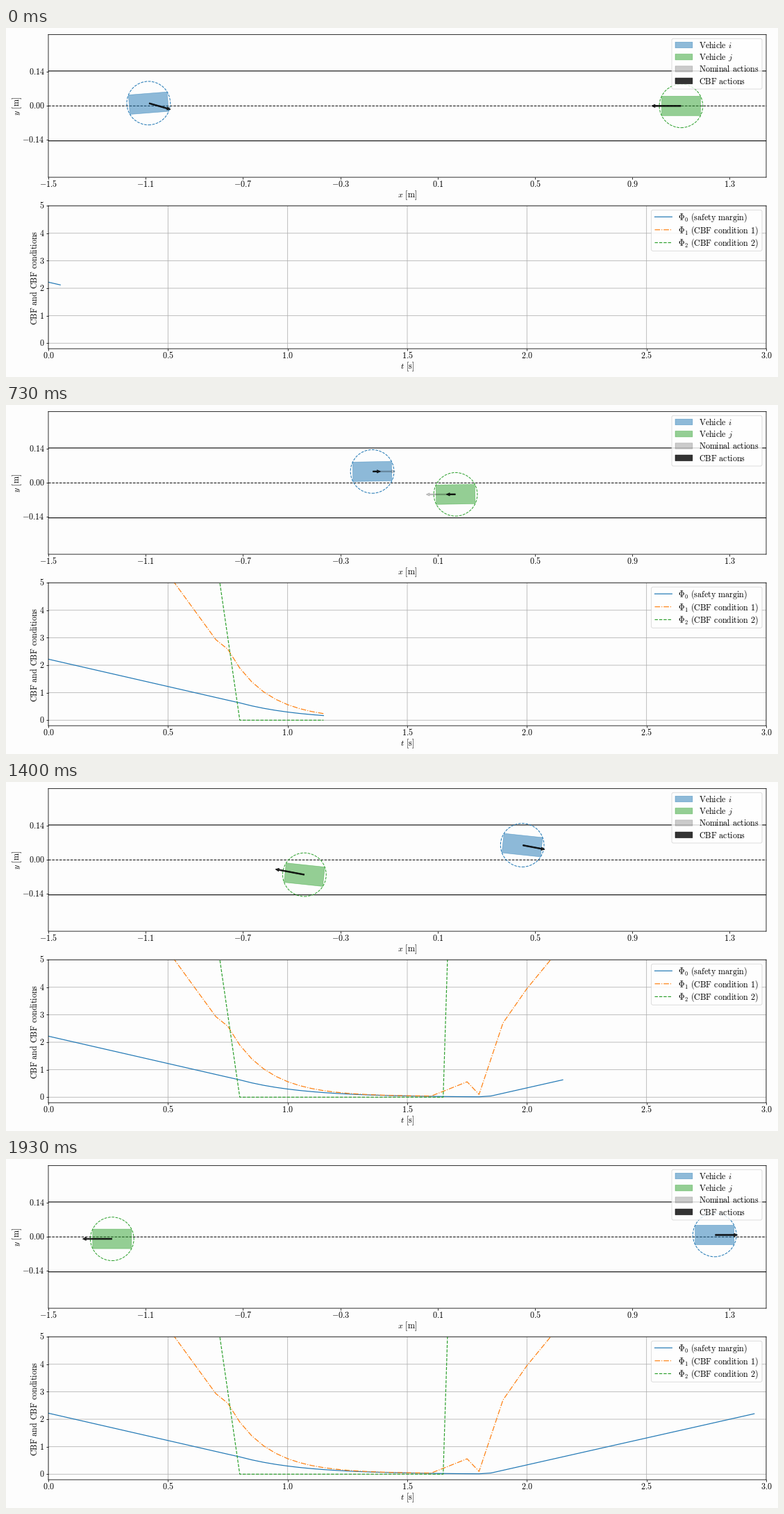
Write a matplotlib script that moves like this. It is 1112 px wide and 503 px high and loops after 2000 ms.

```python
import numpy as np
import matplotlib.pyplot as plt
from matplotlib.animation import FuncAnimation
from matplotlib.patches import Circle, FancyArrow, FancyBboxPatch, Polygon, Rectangle

W, H, DPI = 1112, 503, 64
PT = 72 / DPI                      # points per pixel
LOOP_MS, TICK_MS, STEPS = 2000, 20, 30
LEFT, WIDTH = 61, 1034
BLUE, ORANGE, GREEN = "tab:blue", "tab:orange", "tab:green"
LENGTH, BREADTH = 0.16, 0.08
HEAD = 0.014

plt.rcParams["mathtext.fontset"] = "cm"
plt.rcParams["axes.linewidth"] = 0.8 * PT
plt.rcParams["path.snap"] = False


def bump(t, center, width):
    return np.exp(-((t - center) / width) ** 2)


def step(t, center, width):
    return 1 / (1 + np.exp((center - t) / width))


# Cruise, brake exponentially while the vehicles pass, then cruise again.
def travel(t):
    braking = -0.031 - 0.318 * np.exp((0.8 - t) / 0.419)
    leaving = 0.25 + 0.988 * (t - 1.95)
    return np.where(t < 0.8, 0.985 * t - 1.1375, np.where(t < 1.6, braking, leaving))


def lateral(t, weave):
    return (0.0118 * weave * bump(t, 0, 0.27) + 0.047 * step(t, 0.7, 0.068)
            + 0.02 * step(t, 1.73, 0.07) - 0.059 * step(t, 2.32, 0.08))


def heading(t, weave):
    return (weave * (5 * bump(t, 0, 0.15) - 2.5 * bump(t, 0.33, 0.1))
            + 11.5 * bump(t, 0.72, 0.17) + bump(t, 1.2, 0.4)
            + 7.5 * bump(t, 1.8, 0.18) - 9 * bump(t, 2.26, 0.18))


def action_angle(t, weave):
    return (-17 * weave * bump(t, 0, 0.19) + 14 * bump(t, 0.66, 0.24)
            - 3.8 * bump(t, 1.5, 0.15) + 8 * bump(t, 1.82, 0.2) - 12 * bump(t, 2.2, 0.19))


def safe_speed(t):
    return 1 if t > 1.6 else np.clip((1.5 - t) / 0.75, 0, 1) ** 2


def phi0(t):
    approach = np.where(t < 0.8, 2.22 - 1.99 * t, 0.63 * np.exp((0.8 - t) / 0.265))
    return np.maximum(approach, 0.24 + 1.96 * (t - 1.95))


def phi1(t):
    approach = np.where(t < 0.72, 2.93 + 11.96 * (0.7 - t),
                        2.55 * np.exp((0.75 - t) / 0.16) + 0.03)
    depart = np.interp(t, [1.6, 1.75, 1.8, 1.9, 2, 2.95], [.04, .56, .1, 2.7, 3.95, 14])
    return np.where(t < 1.62, approach, depart)


def phi2(t):
    return np.maximum(0, np.maximum(60 * (0.8 - t), 278 * (t - 1.65)))


fig = plt.figure(figsize=(W / DPI, H / DPI), dpi=DPI, facecolor="#fdfdfd")


def panel(top, bottom, xlim, ylim, xticks, yticks):
    ax = fig.add_axes([LEFT / W, 1 - bottom / H, WIDTH / W, (bottom - top) / H],
                      facecolor="none", xlim=xlim, ylim=ylim)
    ax.set_xticks(xticks)
    ax.set_yticks(yticks)
    ax.tick_params(length=2.6 * PT, width=0.8 * PT, labelbottom=False, labelleft=False)
    return ax


road_x, road_y = np.arange(-1.5, 1.4, 0.4), np.array([-.14, 0, .14])
time_x, phi_y = np.arange(0, 3.1, 0.5), np.arange(6)
road = panel(9.5, 215.1, (-1.5, 1.45), (-.293, .293), road_x, road_y)
chart = panel(256.2, 462.2, (0, 3), (-.2, 5), time_x, phi_y)
chart.grid(color="#b0b0b0", lw=0.8 * PT)
chart.set_axisbelow(True)

# Full-page layer in pixel coordinates for text and legends.
page = fig.add_axes([0, 0, 1, 1], xlim=(0, W), ylim=(H, 0), zorder=5)
page.axis("off")
SPACE = r"\hspace{0.38}"


def label(x, y, text, **style):
    style = {"va": "baseline", "fontsize": 12 * PT, **style}
    page.text(x, y, f"${text}$", **style)


def roman(text):
    return r"\mathrm{" + text.replace(" ", SPACE) + "}"


for x in road_x:
    label(LEFT + (x + 1.5) * WIDTH / 2.95, 229, f"{x:.1f}", ha="center")
for y in road_y:
    label(55.5, 116.3 - y * 350.5, f"{y:.2f}", ha="right")
for x in time_x:
    label(LEFT + x * WIDTH / 3, 475.8, f"{x:.1f}", ha="center")
for y in phi_y:
    label(55.5, 458.3 - y * 39.6, f"{y}", ha="right")
label(577.7, 244, "x" + SPACE + roman("[m]"), ha="center")
label(577.7, 491, "t" + SPACE + roman("[s]"), ha="center")
label(16, 112.3, "y" + SPACE + roman("[m]"), ha="center", va="center", rotation=90)
label(41, 359.5, roman("CBF and CBF conditions"), ha="center", va="center", rotation=90)


def legend_box(x, y, width, height):
    page.add_patch(FancyBboxPatch((x, y), width, height,
                                  boxstyle="round,pad=0,rounding_size=2.4",
                                  fc="white", ec="0.8", alpha=0.8, lw=0.8 * PT))


legend_box(959, 15.3, 130, 72.7)
swatches = [(BLUE, .5, roman("Vehicle ") + "i"), (GREEN, .5, roman("Vehicle ") + "j"),
            ("black", .2, roman("Nominal actions")), ("black", .8, roman("CBF actions"))]
for row, (color, alpha, text) in enumerate(swatches):
    y = 24.5 + 17.25 * row
    page.add_patch(Rectangle((964, y - 4.2), 24.8, 8.4, color=color, alpha=alpha,
                             lw=0.7 * PT))
    label(998.3, y + 4.4, text)

legend_box(929.5, 262.3, 159.5, 59)
curves = []
series = [(phi0, BLUE, "-", "safety margin"), (phi1, ORANGE, "-.", "CBF condition 1"),
          (phi2, GREEN, "--", "CBF condition 2")]
for row, (phi, color, dash, text) in enumerate(series):
    style = dict(color=color, ls=dash, lw=1.2 * PT)
    y = 272.2 + 18.6 * row
    page.plot([934.5, 959.3], [y, y], **style)
    label(968.5, y + 4.4, rf"\Phi_{row}" + SPACE + roman(f"({text})"))
    curves.append((phi, chart.plot([], [], **style)[0]))

for y in (-.1435, .1435):
    road.axhline(y, color="black", lw=1.1 * PT)
road.axhline(0, color="black", ls="--", lw=PT)


class Vehicle:
    def __init__(self, color, start, reach, flip):
        self.start, self.reach, self.flip = start, reach, flip
        self.body = road.add_patch(Polygon(np.zeros((4, 2)), color=color, alpha=.5,
                                           lw=0.7 * PT, zorder=3))
        self.ring = road.add_patch(Circle((0, 0), np.hypot(LENGTH, BREADTH) / 2,
                                          fill=False, ec=color, ls="--", lw=PT, zorder=3))
        self.nominal, self.safe = [road.add_patch(
            FancyArrow(0, 0, .1, 0, width=.0045, head_width=.0125, head_length=HEAD,
                       length_includes_head=True, color="black", alpha=alpha,
                       lw=0.8 * PT, zorder=4)) for alpha in (.2, .8)]

    def aim(self, arrow, center, angle, speed):
        a = np.radians(angle)
        forward = self.flip * np.array([np.cos(a), np.sin(a)])
        x, y = center + self.start * forward
        dx, dy = (HEAD + speed * (self.reach - self.start - HEAD)) * forward
        arrow.set_data(x=x, y=y, dx=dx, dy=dy)

    def place(self, t, weave, shift):
        center = self.flip * np.array([travel(t), lateral(t, weave)]) + (shift, 0)
        a = np.radians(heading(t, weave))
        turn = np.array([[np.cos(a), np.sin(a)], [-np.sin(a), np.cos(a)]])
        corners = np.array([(-1, -1), (1, -1), (1, 1), (-1, 1)]) * (LENGTH / 2, BREADTH / 2)
        self.body.set_xy(corners @ turn + center)
        self.ring.center = center
        angle = action_angle(t, weave)
        self.aim(self.nominal, center, angle, 1)
        self.aim(self.safe, center, angle - 4 * bump(t, 0.75, 0.1), safe_speed(t))


vehicle_i = Vehicle(BLUE, .003, .094, 1)
vehicle_j = Vehicle(GREEN, .001, .121, -1)


def update(frame):
    # Thirty simulation steps per loop, rounded to the nearest tick.
    k = int((frame * TICK_MS + 15) * STEPS // LOOP_MS)
    t = 0.05 + 0.1 * k
    vehicle_i.place(t, weave=1, shift=0)
    vehicle_j.place(t, weave=0, shift=0.012 * step(-t, -1.1, 0.1))
    times = 0.05 * np.arange(2 * k + 2)
    for phi, line in curves:
        line.set_data(times, phi(times))


anim = FuncAnimation(fig, update, frames=LOOP_MS // TICK_MS, interval=TICK_MS,
                     init_func=lambda: update(0), repeat=True)
plt.show()
```
